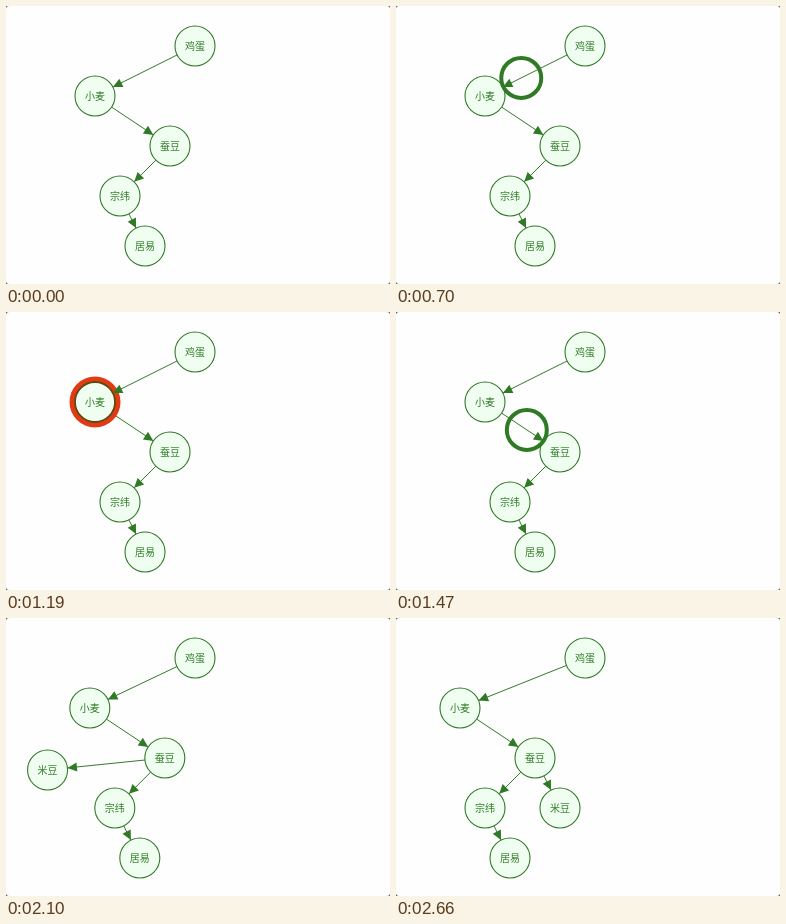
Recreate the animation shown at these times as an HTML page. Size 384x278 px, loop 2.94 s.

```html
<!DOCTYPE html>
<html lang="zh">
<head>
<meta charset="utf-8">
<title>Binary tree insertion</title>
<style>
html, body { margin: 0; width: 100%; height: 100%; overflow: hidden; background: #555; }
svg { display: block; width: 384px; height: 278px; }
.node circle { fill: #f0fef2; stroke: #34792a; stroke-width: 1.1; }
.node.hot circle { stroke: #5c4c12; stroke-width: 1.8; }
text { font: 10px "Noto Sans CJK SC", "Noto Sans CJK", "Noto Sans CJK JP", sans-serif; fill: #2f7a24; text-anchor: middle; }
line { stroke: #34792a; stroke-width: 1; }
polygon { fill: #2f7a24; }
#halo { fill: #e23a14; }
#ring { fill: none; stroke: #2f7a24; stroke-width: 4; }
</style>
</head>
<body>
<svg id="stage" viewBox="0 0 384 278">
  <rect width="384" height="278" rx="3" fill="#fefefe"/>
  <g id="lines"></g>
  <circle id="halo"/>
  <g id="heads"></g>
  <g id="nodes"></g>
  <circle id="ring" r="20"/>
</svg>
<script>
const LOOP = 2940, R = 20, STEP = 400;
const INSERT = 2018;

// Start position, end position and parent index
const nodes = [
  { label: '鸡蛋', from: [189, 40], to: [189, 40] },
  { label: '小麦', from: [89, 90], to: [64, 90], parent: 0 },
  { label: '蚕豆', from: [164, 140], to: [139, 140], parent: 1 },
  { label: '宗纬', from: [114, 190], to: [89, 190], parent: 2 },
  { label: '居易', from: [139, 240], to: [114, 240], parent: 3 },
  { label: '米豆', from: [9.5, 142], to: [164, 190], parent: 2, added: true }
];
const visits = [
  { node: 0, start: 46, end: 446 },
  { node: 1, start: 846, end: 1248 },
  { node: 2, start: 1648, end: INSERT }
];

const $ = id => document.getElementById(id);
const clamp = v => Math.min(1, Math.max(0, v));
const mix = (a, b, p) => a.map((v, i) => v + (b[i] - v) * p);

function add(parent, tag, attrs = {}) {
  const el = document.createElementNS('http://www.w3.org/2000/svg', tag);
  set(el, attrs);
  return parent.appendChild(el);
}
function set(el, attrs) {
  for (const k in attrs) el.setAttribute(k, attrs[k]);
}
function show(el, on) {
  el.style.display = on ? '' : 'none';
}

for (const n of nodes) {
  n.g = add($('nodes'), 'g', { class: 'node' });
  add(n.g, 'circle', { r: R });
  add(n.g, 'text', { y: 3.8 }).textContent = n.label;
  if (n.parent !== undefined) {
    n.line = add($('lines'), 'line');
    n.head = add($('heads'), 'polygon', { points: '0,0 -9.5,-4.6 -9.5,4.6' });
  }
}

function drawEdge(n) {
  const [x1, y1] = nodes[n.parent].pos, [x2, y2] = n.pos;
  const a = Math.atan2(y2 - y1, x2 - x1);
  const dx = R * Math.cos(a), dy = R * Math.sin(a);
  set(n.line, { x1: x1 + dx, y1: y1 + dy, x2: x2 - dx, y2: y2 - dy });
  set(n.head, { transform: `translate(${x2 - dx} ${y2 - dy}) rotate(${a * 180 / Math.PI})` });
}

function render(t) {
  const p = clamp((t - INSERT) / STEP);
  const hot = visits.find(v => t >= v.start && t < v.end);

  nodes.forEach((n, i) => {
    n.pos = mix(n.from, n.to, p);
    set(n.g, {
      transform: `translate(${n.pos})`,
      class: hot && hot.node === i ? 'node hot' : 'node'
    });
    if (n.line) drawEdge(n);
    if (n.added) [n.g, n.line, n.head].forEach(el => show(el, t >= INSERT));
  });

  show($('halo'), hot);
  if (hot) {
    const [cx, cy] = nodes[hot.node].pos;
    const pulse = Math.cos(2 * Math.PI * (t - 1190) / 315);
    set($('halo'), { cx, cy, r: 25 + 0.5 * pulse });
  }

  // The ring travels between two consecutive visits
  const k = visits.findIndex((v, i) => i < 2 && t >= v.end && t < visits[i + 1].start);
  show($('ring'), k >= 0);
  if (k >= 0) {
    const a = visits[k], b = visits[k + 1];
    const [cx, cy] = mix(nodes[a.node].pos, nodes[b.node].pos, (t - a.end) / (b.start - a.end));
    set($('ring'), { cx, cy });
  }
}

const t0 = performance.now();
function tick() {
  render((performance.now() - t0) % LOOP);
  requestAnimationFrame(tick);
}
tick();
</script>
</body>
</html>
```
